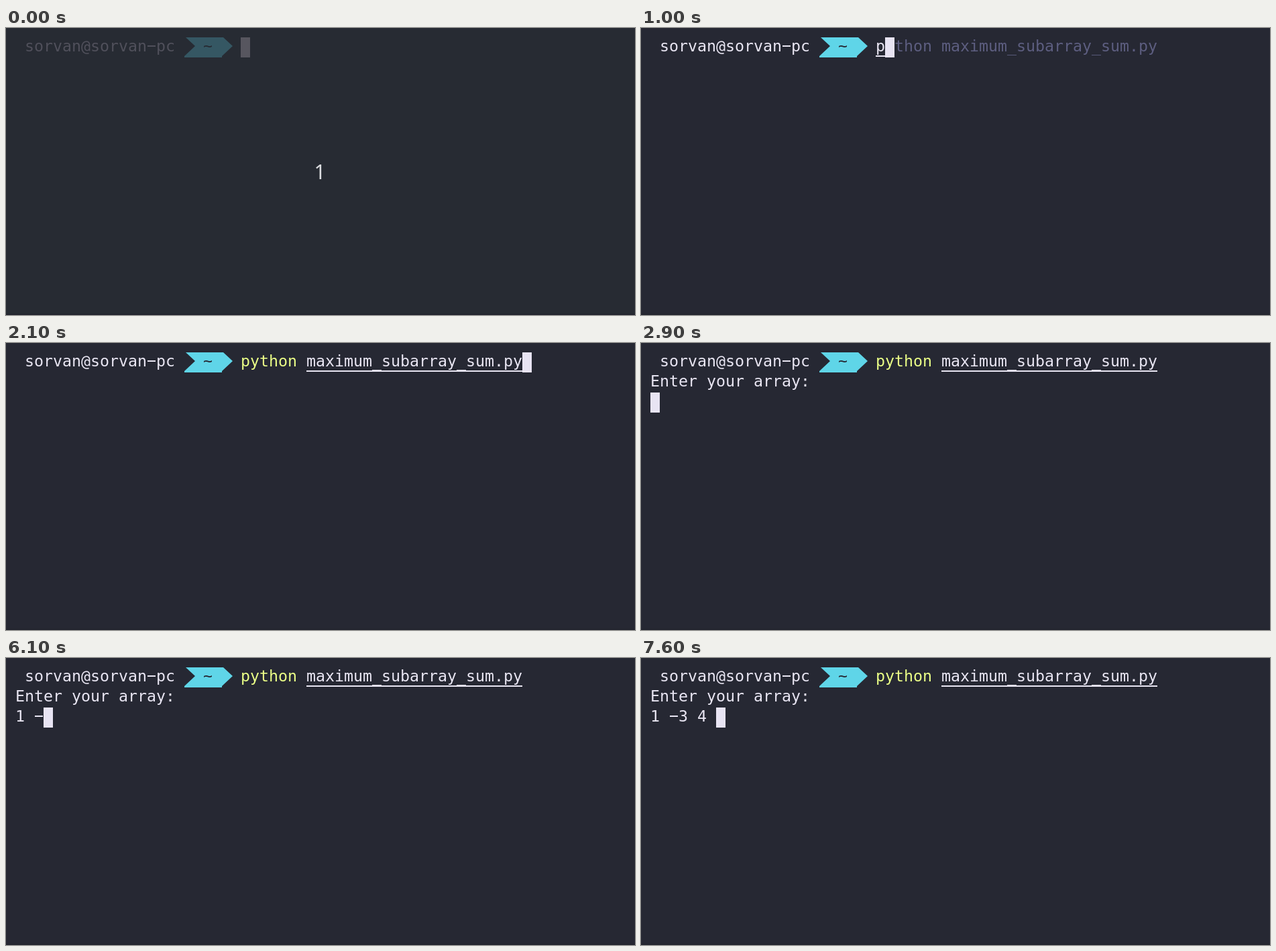
An HTML page with a canvas for the animation above (8000 ms loop, 938x429 px).

```html
<!DOCTYPE html>
<html lang="en">
<head>
<meta charset="utf-8">
<title>Terminal session</title>
<style>
html, body { margin: 0; width: 100%; height: 100%; overflow: hidden; background: #262833; }
canvas { display: block; width: 938px; height: 429px; }
</style>
</head>
<body>
<canvas id="stage" width="938" height="429"></canvas>
<script>
const ctx = document.getElementById('stage').getContext('2d');
const LOOP = 8000, CELL = 14, ROW = 30, PAD = 14;
const USER = 'sorvan@sorvan-pc';
const COMMAND = 'python', FILE = 'maximum_subarray_sum.py';
const LINE = COMMAND + ' ' + FILE;
const INPUT = '1 -3 4 ';
const START = 24; // column where the command begins

// Time of each key press, in ms
const COMMAND_KEYS = [1000, 1100, 1300, 1400];
const INPUT_KEYS = [5400, 5600, 6100, 6200, 6300, 7300, 7600];
const READY = 100, COMPLETE = 2100, ENTER = 2900;

const BRIGHT = { bg: '#262833', text: '#e9e6f3', tag: '#5fd5e8', cursor: '#e8e4f3' };
const DIM = { bg: '#272b33', text: '#50505b', tag: '#355763', cursor: '#57565f' };
const PINK = '#ea4fae', LIME = '#ebff87', HINT = '#5d5e80';

const colX = col => PAD + col * CELL;
const rowY = row => PAD + row * ROW;
const typed = (keys, t) => keys.filter(k => k <= t).length;

function rect(x, y, w, h, color) {
  ctx.fillStyle = color;
  ctx.fillRect(x, y, w, h);
}

// One glyph per terminal cell; dashes span the cell
function write(text, col, row, color, weight = 400) {
  ctx.font = weight + ' 23.25px "DejaVu Sans Mono", "Noto Sans Mono", monospace';
  ctx.textAlign = 'left';
  ctx.fillStyle = color;
  [...text].forEach((ch, i) => {
    const x = colX(col + i), y = rowY(row);
    if (ch === '-') ctx.fillRect(x + 1, y + 12, 12, 2);
    else ctx.fillText(ch, x, y + 21);
  });
}

function underline(col, count, color) {
  rect(colX(col), 41, count * CELL, 2, color);
}

function cursor(col, row, color) {
  rect(colX(col), rowY(row), CELL, ROW, color);
}

function prompt(theme) {
  write(USER, 1, 0, theme.text);
  ctx.fillStyle = theme.tag;
  ctx.beginPath();
  [[268, 14], [324, 14], [338, 27], [322, 42], [322, 44], [266, 44], [266, 42], [282, 27]]
    .forEach(([x, y]) => ctx.lineTo(x, y));
  ctx.fill();
  write('~', 20, 0, theme.bg);
}

function commandLine(t, theme) {
  if (t >= COMPLETE) {
    write(COMMAND, START, 0, LIME);
    write(FILE, START + COMMAND.length + 1, 0, theme.text);
    underline(START + COMMAND.length + 1, FILE.length, theme.text);
    if (t < ENTER) cursor(START + LINE.length, 0, theme.cursor);
    return;
  }
  const n = typed(COMMAND_KEYS, t);
  if (n) write(LINE.slice(n + 1), START + n + 1, 0, HINT);
  if (n === 1) {
    write(LINE[0], START, 0, theme.text);
    underline(START, 1, theme.text);
  } else {
    write(LINE.slice(0, n), START, 0, PINK, 700);
  }
  cursor(START + n, 0, theme.cursor);
}

function draw(t) {
  const theme = t < READY ? DIM : BRIGHT;
  rect(0, 0, 938, 429, theme.bg);
  rect(0, 427, 938, 2, '#22242e');
  prompt(theme);
  commandLine(t, theme);
  if (t < READY) {
    ctx.font = '30px "Noto Sans", "Open Sans", sans-serif';
    ctx.textAlign = 'center';
    ctx.fillStyle = '#dcdde0';
    ctx.fillText('1', 468, 226);
  }
  if (t >= ENTER) {
    const n = typed(INPUT_KEYS, t);
    write('Enter your array:', 0, 1, theme.text);
    write(INPUT.slice(0, n), 0, 2, theme.text);
    cursor(n, 2, theme.cursor);
  }
}

const begin = performance.now();
function frame() {
  draw((performance.now() - begin) % LOOP);
  requestAnimationFrame(frame);
}
frame();
</script>
</body>
</html>
```
